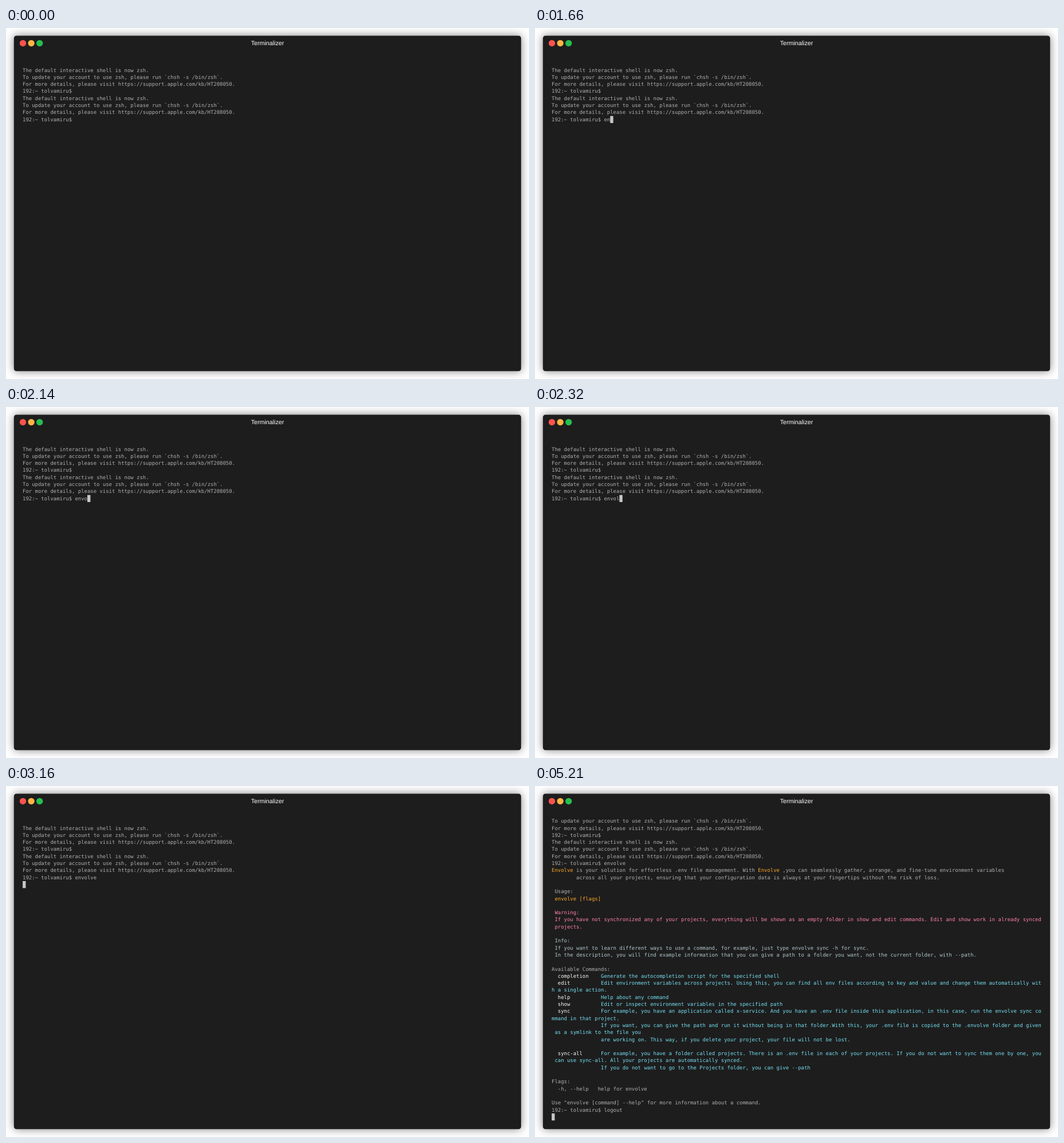
These frames come from a looping animation (913x613 px, 5.38 s). An HTML page with a canvas:

```html
<!DOCTYPE html>
<html lang="en">
<head>
<meta charset="utf-8">
<title>Terminal</title>
<style>
  html, body { margin: 0; width: 100%; height: 100%; overflow: hidden; background: #fff; }
  canvas { display: block; }
</style>
</head>
<body>
<canvas id="stage" width="913" height="613"></canvas>
<script>
const ctx = document.getElementById('stage').getContext('2d', { alpha: false });

const LOOP = 5380;
const ROWS = 43;
const LEFT = 29.1, TOP = 55.3, CELL = 5.376, LINE = 12.298, BASE = 9;
const COLORS = {
  d: '#afafaf', y: '#ffa727', r: '#ff7fac', i: '#b1c6ca', w: '#f9f9f4', c: '#75dff2'
};
const PROMPT = '192:~ tolvamiru$ ';
const COMMAND = 'envolve';
// Moment at which each letter of the command appears
const KEYS = [1540, 1660, 2020, 2140, 2320, 2460, 2840];
const ENTER = 3160, OUTPUT = 3210, LOGOUT = 5210;

const GREETING = [
  'The default interactive shell is now zsh.',
  'To update your account to use zsh, please run `chsh -s /bin/zsh`.',
  'For more details, please visit https://support.apple.com/kb/HT208050.'
];
const INTRO = ['', ...GREETING, PROMPT, ...GREETING];

// {x} switches the colour for the rest of the line
const HELP = `{y}Envolve{d} is your solution for effortless .env file management. With {y}Envolve{d} ,you can seamlessly gather, arrange, and fine-tune environment variables
        across all your projects, ensuring that your configuration data is always at your fingertips without the risk of loss.

 Usage:
{y} envolve [flags]

{r} Warning:
{r} If you have not synchronized any of your projects, everything will be shown as an empty folder in show and edit commands. Edit and show work in already synced
{r} projects.

{i} Info:
{i} If you want to learn different ways to use a command, for example, just type envolve sync -h for sync.
{i} In the description, you will find example information that you can give a path to a folder you want, not the current folder, with --path.

Available Commands:
{w}  completion    {c}Generate the autocompletion script for the specified shell
{w}  edit          {c}Edit environment variables across projects. Using this, you can find all env files according to key and value and change them automatically wit
{c}h a single action.
{w}  help          {c}Help about any command
{w}  show          {c}Edit or inspect environment variables in the specified path
{w}  sync          {c}For example, you have an application called x-service. And you have an .env file inside this application, in this case, run the envolve sync co
{c}mmand in that project.
{c}                If you want, you can give the path and run it without being in that folder.With this, your .env file is copied to the .envolve folder and given
{c} as a symlink to the file you
{c}                are working on. This way, if you delete your project, your file will not be lost.

{w}  sync-all      {c}For example, you have a folder called projects. There is an .env file in each of your projects. If you do not want to sync them one by one, you
{c} can use sync-all. All your projects are automatically synced.
{c}                If you do not want to go to the Projects folder, you can give --path

Flags:
  -h, --help   help for envolve

Use "envolve [command] --help" for more information about a command.`.split('\n');

function screenAt(t) {
  const typed = KEYS.filter(k => t >= k).length;
  const lines = [...INTRO, PROMPT + COMMAND.slice(0, typed)];
  if (t >= OUTPUT) lines.push(...HELP, PROMPT + (t >= LOGOUT ? 'logout' : ''));
  if (t >= LOGOUT || (t >= ENTER && t < OUTPUT)) lines.push('');
  return { lines: lines.slice(-ROWS), cursor: typed > 0 };
}

function drawWindow() {
  ctx.fillStyle = '#fff';
  ctx.fillRect(0, 0, 913, 613);
  ctx.save();
  ctx.shadowColor = 'rgba(0,0,0,.5)';
  ctx.shadowBlur = 15;
  ctx.fillStyle = '#1d1d1d';
  ctx.beginPath();
  ctx.roundRect(13.8, 13.5, 885.4, 585.7, 4.5);
  ctx.fill();
  ctx.restore();

  ['#fd544e', '#feb545', '#25c04f'].forEach((color, i) => {
    ctx.fillStyle = color;
    ctx.beginPath();
    ctx.arc(29.5 + i * 14.6, 26.6, 5.65, 0, Math.PI * 2);
    ctx.fill();
  });

  ctx.font = '10.7px "Liberation Sans", Arial, sans-serif';
  ctx.textAlign = 'center';
  ctx.fillStyle = '#fff';
  ctx.fillText('Terminalizer', 456.5, 30.4);
}

function drawLine(line, row) {
  const y = TOP + row * LINE + BASE;
  let col = 0;
  line.split(/\{(\w)\}/).forEach((part, i) => {
    if (i % 2) {
      ctx.fillStyle = COLORS[part];
      return;
    }
    for (const word of part.matchAll(/\S+/g)) {
      ctx.fillText(word[0], LEFT + (col + word.index) * CELL, y);
    }
    col += part.length;
  });
}

function draw({ lines, cursor }) {
  ctx.textRendering = 'geometricPrecision';
  drawWindow();
  ctx.font = '8.93px "DejaVu Sans Mono", monospace';
  ctx.textAlign = 'left';
  lines.forEach((line, row) => {
    ctx.fillStyle = COLORS.d;
    drawLine(line, row);
  });
  if (cursor) {
    const row = lines.length - 1;
    ctx.fillStyle = '#c7c7c7';
    ctx.fillRect(LEFT + lines[row].length * CELL, TOP + row * LINE, CELL, LINE);
  }
}

const start = performance.now();
let shown = '';
function tick() {
  const screen = screenAt((performance.now() - start) % LOOP);
  const key = screen.lines.join('\n');
  if (key !== shown) {
    draw(screen);
    shown = key;
  }
  requestAnimationFrame(tick);
}
tick();
</script>
</body>
</html>
```
